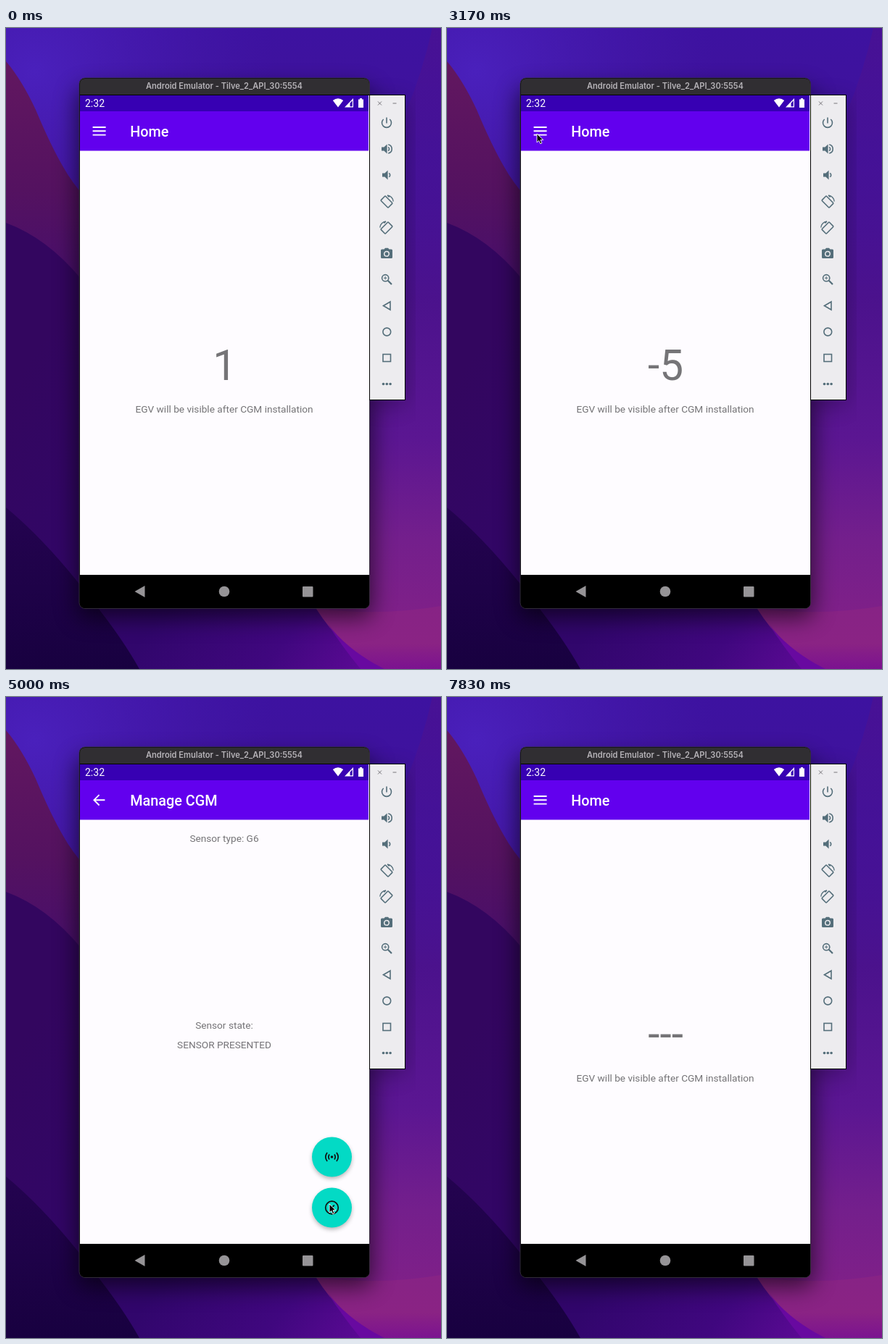
Recreate the animation shown at these times as an HTML page. Size 600 px wide and 885 px high, loop 7910 ms.

```html
<!DOCTYPE html>
<html lang="en">
<head>
<meta charset="utf-8">
<title>Sensor app demo</title>
<style>
  html, body { margin: 0; width: 100%; height: 100%; overflow: hidden; background: #2a0658; }
  svg { display: block; width: 100vw; height: 100vh; }
  text { font-family: Roboto, sans-serif; font-size: 13.65px; }
  .mid { text-anchor: middle; fill: #757477; }
  .bold { font-weight: 500; }
  .line { fill: none; stroke: #546e7a; stroke-width: 1.6; }
  .solid { fill: #546e7a; }
</style>
</head>
<body>
<svg viewBox="0 0 600 885" preserveAspectRatio="none">
  <defs>
    <linearGradient id="sky" x1="0" y1="0" x2="0" y2="1">
      <stop offset="0" stop-color="#3d12a0"/><stop offset=".2" stop-color="#40129b"/>
      <stop offset=".42" stop-color="#4b128c"/><stop offset=".64" stop-color="#5b1692"/>
      <stop offset=".8" stop-color="#741f8c"/><stop offset=".92" stop-color="#7f2088"/>
    </linearGradient>
    <radialGradient id="glow" gradientUnits="userSpaceOnUse" cx="40" cy="60" r="330">
      <stop offset="0" stop-color="#4a20bc"/><stop offset="1" stop-color="#4519ac" stop-opacity="0"/>
    </radialGradient>
    <linearGradient id="edge" x1="0" y1="0" x2="0" y2="1">
      <stop offset="0" stop-color="#4a1192" stop-opacity=".8"/><stop offset="1" stop-color="#4a1192" stop-opacity="0"/>
    </linearGradient>
    <linearGradient id="maroon" x1="0" y1="0" x2="0" y2="1">
      <stop offset="0" stop-color="#621760"/><stop offset=".5" stop-color="#541260"/><stop offset="1" stop-color="#430d70"/>
    </linearGradient>
    <linearGradient id="violet" gradientUnits="userSpaceOnUse" x1="0" y1="500" x2="520" y2="880">
      <stop offset="0" stop-color="#33065f"/><stop offset=".55" stop-color="#31066c"/>
      <stop offset=".8" stop-color="#40077f"/><stop offset="1" stop-color="#600a98"/>
    </linearGradient>
    <linearGradient id="pink" x1="0" y1="0" x2="0" y2="1">
      <stop offset="0" stop-color="#872385"/><stop offset=".6" stop-color="#8a2384"/><stop offset="1" stop-color="#7b1290"/>
    </linearGradient>
    <linearGradient id="navy" x1="0" y1="0" x2="0" y2="1">
      <stop offset="0" stop-color="#240350"/><stop offset="1" stop-color="#180140"/>
    </linearGradient>
    <linearGradient id="shade" x1="0" x2="1">
      <stop offset="0" stop-opacity=".25"/><stop offset="1" stop-opacity="0"/>
    </linearGradient>
    <filter id="blur" x="-30%" y="-30%" width="160%" height="160%"><feGaussianBlur stdDeviation="16"/></filter>
    <filter id="soft" x="-30%" y="-30%" width="160%" height="160%"><feGaussianBlur stdDeviation="3"/></filter>
    <clipPath id="content"><rect x="102" y="115" width="399" height="640"/></clipPath>
    <clipPath id="disc"><circle cx="301" cy="388" r="121.5"/></clipPath>
    <g id="rotate" class="line">
      <rect x="-4.4" y="-7.2" width="8.8" height="14.4" rx="1" transform="rotate(-45)"/>
      <path d="M1-9A9 9 0 0 1 9.2-.5M1-9l2.600 2.600" stroke-width="1.4"/>
    </g>
    <path id="speaker" class="solid" d="M-7-2.5h3.4L.6-6.6V6.6L-3.6 2.5H-7z"/>
  </defs>

  <!-- wallpaper -->
  <rect width="600" height="885" fill="url(#sky)"/>
  <rect width="600" height="420" fill="url(#glow)"/>
  <path d="M600 0H588Q575 60 550 120V420H600z" fill="url(#edge)"/>
  <path d="M0 46Q22 72 41 113Q62 163 79 192Q90 212 110 235V400H0z" fill="url(#maroon)"/>
  <path d="M0 269Q57 290 104 347Q300 590 430 804Q470 860 492 885H0z" fill="url(#violet)"/>
  <path d="M428 802Q520 812 600 798V885H522Q466 862 428 802z" fill="url(#pink)"/>
  <path d="M444 823Q472 860 522 885H489Q462 852 444 823z" fill="#6809a0"/>
  <path d="M0 662Q60 712 120 792Q160 842 184 885H0z" fill="url(#navy)"/>

  <!-- emulator window -->
  <rect x="98" y="84" width="407" height="730" rx="10" opacity=".62" filter="url(#blur)"/>
  <rect x="502" y="100" width="48" height="420" opacity=".3" filter="url(#blur)"/>
  <rect x="101" y="69" width="400.5" height="732.5" rx="8" fill="#000" stroke="#3c3842" stroke-width=".8"/>
  <path d="M102 92V77q0-7 7-7H494q7 0 7 7V92z" fill="#302e32"/>
  <text x="301" y="83.5" text-anchor="middle" fill="#b6b3b8" style="font:600 11.1px Inter,sans-serif">Android Emulator - Tilve_2_API_30:5554</text>

  <!-- side panel -->
  <rect x="501.5" y="92.5" width="49" height="421" fill="#edecef" stroke="#000"/>
  <path d="M513 101.5l5 5m0-5l-5 5M533.5 104h5" stroke="#77757a" fill="none"/>
  <g transform="translate(525 131)"><path class="line" stroke-width="1.8" d="M0-7.5V.5M-4.3-5A6.5 6.5 0 1 0 4.3-5"/></g>
  <g transform="translate(525 167)"><use href="#speaker"/><path class="line" d="M2.2-2.8Q5 0 2.2 2.8M2.2-6A6.1 6.1 0 0 1 2.2 6"/></g>
  <g transform="translate(526 203)"><use href="#speaker"/><path class="line" d="M2.4-2.8Q5 0 2.4 2.8"/></g>
  <use href="#rotate" x="525" y="240"/>
  <use href="#rotate" transform="translate(525 276) scale(-1 1)"/>
  <g transform="translate(525 311)">
    <path class="solid" d="M-6.5-5.5h3L-2-7.3H2L3.5-5.5H6.5Q8-5.5 8-4V5.5Q8 7 6.5 7H-6.5Q-8 7-8 5.5V-4Q-8-5.5-6.5-5.5z"/>
    <circle cy=".8" r="3.3" fill="#546e7a" stroke="#edecef" stroke-width="1.5"/>
  </g>
  <g transform="translate(525 347)" class="line"><circle cx="-1.8" cy="-1.8" r="4.6"/><path d="M1.8 1.8L7 7" stroke-width="2.2"/><path d="M-4-1.8H.4M-1.8-4V.4" stroke-width="1"/></g>
  <path class="line" d="M520.5 383.5L530 378V389z"/>
  <circle class="line" cx="525.3" cy="419.5" r="5.4"/>
  <rect class="line" x="520" y="450.5" width="10.5" height="10"/>
  <g class="solid"><circle cx="520.5" cy="491.5" r="1.8"/><circle cx="525.3" cy="491.5" r="1.8"/><circle cx="530.1" cy="491.5" r="1.8"/></g>

  <!-- app -->
  <rect x="102" y="93" width="399" height="662" fill="#fefcff"/>
  <g clip-path="url(#content)">
    <g id="home">
      <text id="value" class="mid" x="301.6" y="486" style="font-size:58.5px"></text>
      <text class="mid" x="301" y="531">EGV will be visible after CGM installation</text>
    </g>
    <g id="manage">
      <text class="mid" x="301" y="200">Sensor type: G6</text>
      <text class="mid" x="301" y="458">Sensor state:</text>
      <text class="mid" x="301" y="484.5">SENSOR PRESENTED</text>
      <g opacity=".3" filter="url(#soft)"><circle cx="449.5" cy="638" r="27"/><circle cx="449.5" cy="708" r="27"/></g>
      <g fill="#03dac5"><circle cx="449.5" cy="635" r="27.5"/><circle cx="449.5" cy="705" r="27.5"/></g>
      <g fill="none" stroke="#111" stroke-width="1.7">
        <g transform="translate(449.5 635)"><circle r="1.8" fill="#111" stroke="none"/><path d="M-3.4-3.6Q-6 0-3.4 3.6M3.4-3.6Q6 0 3.4 3.6M-6.4-6Q-11 0-6.4 6M6.4-6Q11 0 6.4 6"/></g>
        <g transform="translate(449.5 705)"><circle r="8.8"/><path d="M-3.3-3.3L3.3 3.3M3.3-3.3L-3.3 3.3"/></g>
      </g>
    </g>
    <rect x="102" y="115" width="398" height="54.5" fill="#6200ee"/>
    <path id="menu" fill="none" stroke="#fff" stroke-width="1.9"/>
    <text id="title" class="bold" x="171.300" y="150" fill="#fff" style="font-size:19.8px"></text>
    <rect id="scrim" x="102" y="115" width="399" height="640"/>
    <g id="drawer">
      <rect x="272" y="115" width="5" height="640" fill="url(#shade)"/>
      <rect y="115" width="272" height="640" fill="#fefcff"/>
      <rect id="checked" x="7.5" y="127" width="257" height="38.5" rx="4" fill="#6200ee" opacity=".13"/>
      <text id="item" class="bold" x="29" y="151">Manage CGM</text>
    </g>
  </g>
  <rect x="102" y="93" width="398" height="22" fill="#3700b3"/>
  <rect id="dim" x="102" y="93" width="399" height="662"/>
  <text x="109" y="109" fill="#fff" style="font-size:14px">2:32</text>
  <g fill="#fff">
    <path d="M458 109.5L450.8 100Q458 94.5 465.2 100z"/>
    <path d="M467 109.5L479 97V109.5z"/><path d="M474.5 103.8L477.8 100.3V108.3H474.5z" fill="#3700b3"/>
    <path d="M486 98.5h2V97h3v1.5h2V110h-7z"/>
  </g>
  <g id="dialog">
    <rect x="128" y="228" width="347" height="420" opacity=".35" filter="url(#soft)"/>
    <rect x="127.5" y="224.5" width="347.5" height="420.5" rx="2" fill="#fefcff"/>
    <text class="mid" x="301" y="248">Sensor Management</text>
    <g clip-path="url(#disc)">
      <circle cx="301" cy="388" r="121.5" fill="#5cb43f"/>
      <path d="M347.5 341.5l130 130-93 93-130-130z" fill="#2fa300"/>
    </g>
    <circle cx="301" cy="388" r="66" fill="#fefcff"/>
    <path d="M271 383.5L291 403.5L331.5 372.5" fill="none" stroke="#2fa300" stroke-width="10" stroke-linecap="round" stroke-linejoin="round"/>
    <text class="mid" x="301" y="540">Sensor has been deleted</text>
    <rect x="152" y="583" width="299" height="34" rx="4" opacity=".3" filter="url(#soft)"/>
    <rect x="151" y="580" width="300.5" height="35.5" rx="4" fill="#6200ee"/>
    <text class="bold" x="302" y="603" text-anchor="middle" fill="#fff" letter-spacing="1.2">OK</text>
  </g>
  <path d="M102 755H501V793q0 8-8 8H110q-8 0-8-8z"/>
  <g fill="#969497"><path d="M177.5 778L191.5 770V786z"/><circle cx="301" cy="778" r="7.3"/><rect x="409" y="771" width="14.5" height="14.5" rx="1"/></g>
  <path id="cursor" d="M0 0V12l2.8-2.6 1.9 4.4 2.2-.9-1.9-4.3h3.9z" stroke="#fff" stroke-width=".9"/>
</svg>
<script>
const LOOP = 7910, STEP = LOOP / 95;
const NAV = 4136, BACK = 6280;
const cursorPath = [
  [1500, 190, -20], [1900, 118, 154], [2500, 118, 154], [2900, 124, 146],
  [4420, 124, 146], [4900, 446, 700], [5450, 446, 700], [5828, 395, 645],
  [6080, 377, 590], [6650, 377, 590], [7150, 470, -20]
];
const el = id => document.getElementById(id);
const clamp = (v, lo = 0, hi = 1) => Math.min(hi, Math.max(lo, v));
const span = (t, start, length) => clamp((t - start) / length);
const lerp = (a, b, p) => a + (b - a) * p;
const smooth = p => (1 - Math.cos(Math.PI * p)) / 2;
const settle = p => 1 - (1 - p) ** 5;
const set = (id, name, value) => el(id).setAttribute(name, value);

function cursorAt(t) {
  const i = cursorPath.findIndex(key => key[0] > t);
  if (i < 1) return [-50, -50];
  const [t0, x0, y0] = cursorPath[i - 1], [t1, x1, y1] = cursorPath[i];
  const p = smooth(span(t, t0, t1 - t0));
  return [lerp(x0, x1, p), lerp(y0, y1, p)];
}

// Three bars at 0, back arrow at 1.
function menuIcon(p) {
  const shaft = lerp(9, 7.8, p), arm = lerp(18, 11, p), angle = p * Math.PI / 4;
  const dx = arm * Math.cos(angle), dy = arm * Math.sin(angle), y = lerp(5.3, -.6, p);
  set('menu', 'd', `M${-shaft} 0h${shaft * 2}M${-shaft} ${y}l${dx} ${dy}M${-shaft} ${-y}l${dx} ${-dy}`);
  set('menu', 'transform', `translate(128.6 142.3) rotate(${180 * p - 180})`);
}

function draw(t) {
  const onManage = t >= NAV && t < BACK;
  const fade = span(t, NAV, 220) - span(t, BACK, 220);
  const drops = clamp(Math.floor((t - 580) / 500) + 1, 0, 6);
  el('value').textContent = t >= BACK ? '---' : 1 - drops;
  el('title').textContent = onManage ? 'Manage CGM' : 'Home';
  set('home', 'opacity', 1 - fade);
  set('manage', 'opacity', fade);
  menuIcon(smooth(span(t, NAV, 350)) - smooth(span(t, 6300, 350)));

  const open = settle(span(t, 3340, 512)) - settle(span(t, 4158.5, 512));
  set('drawer', 'transform', `translate(${102 - 272 * (1 - open)})`);
  set('drawer', 'visibility', open > .002 ? 'visible' : 'hidden');
  set('scrim', 'opacity', Math.min(.6, .75 * open));
  set('checked', 'visibility', open > .002 && onManage ? 'visible' : 'hidden');
  set('item', 'fill', onManage ? '#6200ee' : '#222');

  const shown = span(t, 5250, 200) - span(t, 6180, 120);
  const scale = lerp(.9, 1, settle(span(t, 5250, 220)));
  set('dim', 'opacity', .6 * shown);
  set('dialog', 'opacity', shown);
  set('dialog', 'transform', `translate(301 435) scale(${scale}) translate(-301 -435)`);
  set('cursor', 'transform', `translate(${cursorAt(t)})`);
}

const began = performance.now();
function tick() {
  const t = (performance.now() - began) % LOOP;
  draw(Math.floor(t / STEP) * STEP);
  requestAnimationFrame(tick);
}
tick();
</script>
</body>
</html>
```
